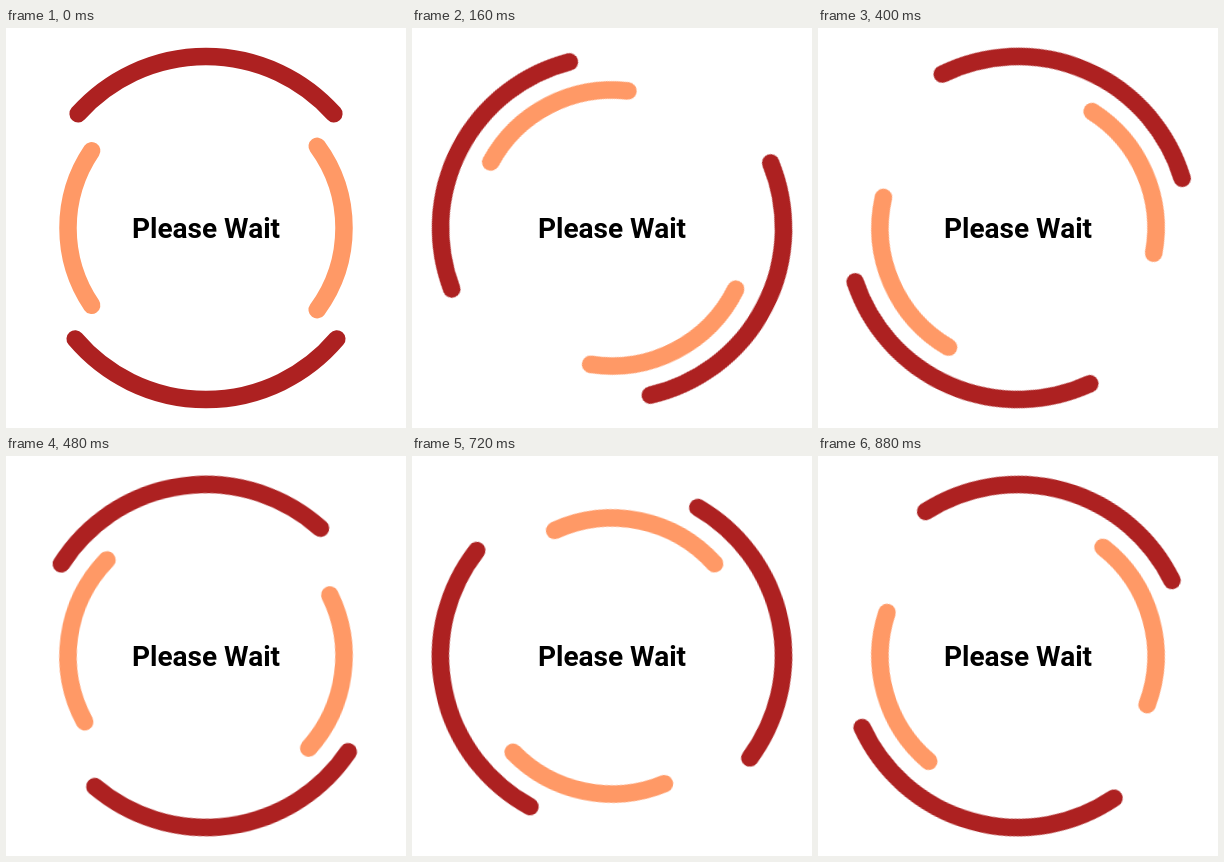
Animation of 400x400 px, one loop 920 ms. Source, as an HTML page:

```html
<!DOCTYPE html>
<html lang="en">
<head>
<meta charset="utf-8">
<title>Please Wait</title>
<style>
  html, body { margin: 0; width: 100%; height: 100%; overflow: hidden; background: #fff; }
  svg { display: block; width: 100%; height: 100%; }
  path { fill: none; stroke-width: 17.5; stroke-linecap: round; }
  text { font: 700 28px Roboto, sans-serif; text-anchor: middle; }
</style>
</head>
<body>
<svg viewBox="0 0 400 400">
  <g transform="translate(200 200)">
    <g id="outer" stroke="#ad2121"></g>
    <g id="inner" stroke="#ff9966"></g>
  </g>
  <text x="200" y="209.5">Please Wait</text>
</svg>
<script>
const LOOP = 920, STEPS = 23;

// Arc of the given sweep, centred on an angle in degrees.
function arc(radius, centre, sweep) {
  const point = deg => {
    const a = deg * Math.PI / 180;
    return `${radius * Math.cos(a)} ${radius * Math.sin(a)}`;
  };
  return `M${point(centre - sweep / 2)}A${radius} ${radius} 0 0 1 ${point(centre + sweep / 2)}`;
}

// Two opposite arcs turning one full revolution per loop.
function ring(id, radius, centre, sweeps, turn) {
  const group = document.getElementById(id);
  sweeps.forEach((sweep, i) => {
    const path = document.createElementNS("http://www.w3.org/2000/svg", "path");
    path.setAttribute("d", arc(radius, centre + 180 * i, sweep));
    group.append(path);
  });
  // The small negative delay keeps step edges clear of rounding.
  group.animate(
    { transform: ["rotate(0deg)", `rotate(${turn}deg)`] },
    { duration: LOOP, delay: -0.5, iterations: Infinity, easing: `steps(${STEPS}, end)` }
  );
}

ring("outer", 171.5, 90, [99.4, 96.4], -360);
ring("inner", 138, 0, [72.6, 68.1], 360);
</script>
</body>
</html>
```
